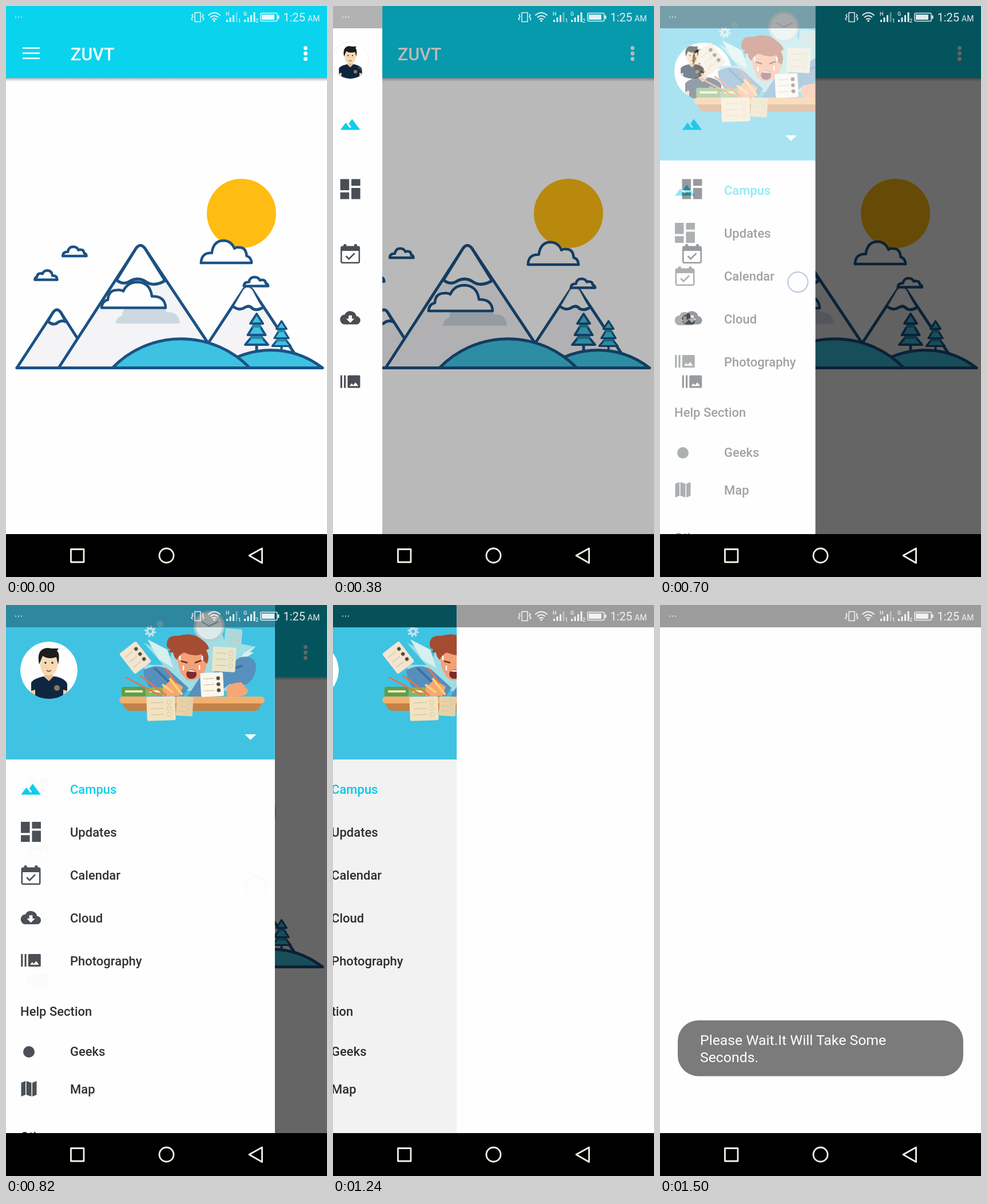
An HTML page that plays this animation: 561 px wide and 998 px high, repeating every 1520 ms.

```html
<!DOCTYPE html>
<html lang="en">
<head>
<meta charset="utf-8">
<title>Navigation drawer</title>
<style>
html, body { margin: 0; width: 100%; height: 100%; overflow: hidden; background: #fff; }
svg { display: block; width: 561px; height: 998px; font-family: Roboto, sans-serif; }
.ink { stroke: #1b5284; stroke-width: 5; stroke-linejoin: round; stroke-linecap: round; }
.cloud { fill: #fefefe; stroke: #1b5284; stroke-width: 4.5; stroke-linejoin: round; }
.icon { fill: #484e53; }
.menu { font-size: 22px; font-weight: 500; fill: #302f2c; }
.line { fill: none; stroke: #fff; }
</style>
</head>
<body>
<svg viewBox="0 0 561 998">
<defs>
  <linearGradient id="drop" x2="0" y2="1"><stop stop-color="#000" stop-opacity=".28"/><stop offset="1" stop-color="#000" stop-opacity="0"/></linearGradient>
  <clipPath id="drawerClip"><rect id="clipRect" height="923"/></clipPath>
  <clipPath id="round"><circle r="50"/></clipPath>
  <path id="puff" vector-effect="non-scaling-stroke" d="M1 46Q2 34 12 32Q13 15 28 15Q35 14 39 17Q46 1 64 1Q86 2 89 26Q112 25 113 46Z"/>
  <g id="tree">
    <path class="ink" d="M0 56V66"/>
    <g fill="#3dc2e2" class="ink" style="stroke-width:4">
      <path d="M0 32L20 56H-20Z"/><path d="M0 14L15.500 39H-15.500Z"/><path d="M0 2L11 19H-11Z"/>
    </g>
    <path d="M-9 41H9L12 46H-12ZM-7 21H7L10 26H-10Z" fill="#2b88a8"/>
  </g>
  <g id="avatar" clip-path="url(#round)">
    <circle r="50" fill="#fff"/>
    <path d="M-31 50V22Q-28 15-10 11H12Q29 15 32 24V50Z" fill="#0d2440"/>
    <path d="M-31 36L-24 34V50H-36ZM32 36L25 34V50H37Z" fill="#f0cda2"/>
    <path d="M-7 5H7V12L0 19L-8 12Z" fill="#e6bd91"/>
    <path d="M-15-25H15V-8Q13 9 0 9Q-13 9-15-8Z" fill="#f6dab3"/>
    <path d="M-17-10Q-21-30-12-36Q-5-41 4-38L17-38L14-34Q20-29 16-10L13-23Q0-18-11-25Z" fill="#1c1b1b"/>
    <circle cx="-6" cy="-13" r="1.8" fill="#332b28"/><circle cx="6" cy="-13" r="1.8" fill="#332b28"/>
    <path d="M-4 0Q0 4 4 0" fill="none" stroke="#a85a48" stroke-width="1.8"/>
    <circle cx="14" cy="31" r="5" fill="#8f7656"/>
  </g>
  <g id="gear" fill="none" stroke="#c3e3ea"><circle r="5" stroke-width="4"/><circle r="8" stroke-width="4" stroke-dasharray="3.140"/></g>
</defs>

<g id="app">
  <rect width="561" height="923" fill="#fefefe"/>
  <circle cx="411.5" cy="362.5" r="60.5" fill="#ffbc12"/>
  <g class="ink" fill="#f4f3f6">
    <path d="M19 632.500L82 536Q89 526 96 536L158 632.500Z"/>
    <path d="M325 632.500L414 497Q422 486 431 497L521 632.500Z"/>
    <path d="M92 632.500L227 424Q235 413 243 424L382 632.500Z"/>
  </g>
  <g class="ink" fill="#fefefe">
    <path d="M73 551L82 536Q89 526 96 536L105 552Q96 548 88 555Q81 558 73 551Z"/>
    <path d="M398 525L414 497Q422 486 431 497L447 528Q438 533 431 529Q425 522 417 527Q409 533 398 525Z" fill-opacity=".9" stroke="none"/>
    <path d="M193 479L227 424Q235 413 243 424L278 480Q260 491 246 483Q232 473 218 480Q206 489 193 479Z"/>
    <path d="M398 526Q409 533 417 527Q425 522 431 529Q438 533 447 528" fill="none"/>
  </g>
  <g id="midShadow"><use href="#puff" transform="translate(191 509)" fill="#cdd8e1"/></g>
  <g id="clouds" class="cloud"></g>
  <use href="#tree" x="438" y="536"/>
  <use href="#tree" transform="translate(481.5 549) scale(.81)"/>
  <g class="ink" fill="#3dc2e2">
    <path d="M373 632.500A146 146 0 0 1 553 632.500Z"/>
    <path d="M186 632.500A167 167 0 0 1 426 632.500Z"/>
    <path d="M19 632.500H553"/>
  </g>
  <rect y="126" width="561" height="6" fill="url(#drop)"/>
  <rect width="561" height="126" fill="#09d3ed"/>
  <path class="line" stroke-width="2.7" d="M29 73.5H59M29 82.5H59M29 91.5H59"/>
  <text x="113" y="95" font-size="30.5" font-weight="500" fill="#fff">ZUVT</text>
  <g fill="#fff"><circle cx="523.5" cy="73.5" r="3.4"/><circle cx="523.5" cy="83" r="3.4"/><circle cx="523.5" cy="92.5" r="3.4"/></g>
  <rect id="scrim" width="561" height="923"/>

  <g id="drawer" clip-path="url(#drawerClip)">
    <rect width="474" height="923" fill="#fefefe"/>
    <g id="mini">
      <circle cx="56" cy="95" r="32.5" fill="none" stroke="#eee"/>
      <use href="#avatar" transform="translate(56 95) scale(.64)"/>
    </g>
    <g id="full">
      <rect width="474" height="923" fill="#fefefe"/>
      <rect width="474" height="270" fill="#3ec3e3"/>
      <use href="#avatar" x="75" y="114"/>
      <g id="desk">
        <path d="M244 66L291 91L298 58L335 66L365 14L385 62L439 73L421 92L440 104L400 150H285L238 104L278 105Z" fill="#9fdde5"/>
        <path d="M250 60L285 78L295 110L270 95ZM418 84L440 71L428 82L436 83L412 99Z" fill="#d5f0ee"/>
        <use href="#gear" x="255" y="46"/><use href="#gear" transform="translate(272 33) scale(.6)" opacity=".6"/>
        <circle cx="358" cy="37" r="25" fill="#dcebea" stroke="#b3cdd2" stroke-width="4"/>
        <path d="M358 37L345 29M358 37L374 29" stroke="#8fa3aa" stroke-width="2"/>
        <path d="M243 114Q266 101 287 113L322 145L312 160H269Q244 139 243 114ZM342 126L383 111L411 92Q435 85 440 105Q440 128 423 139L394 138L366 160H320Z" fill="#568fbd"/>
        <path d="M262 110Q280 126 306 154M388 115L416 106" fill="none" stroke="#3a729f" stroke-width="4"/>
        <path d="M388 148Q391 136 414 135L426 149Q425 160 407 160H389ZM273 148L292 130L312 143L306 159H277Z" fill="#f7a574"/>
        <path d="M303 78L349 74Q359 92 350 117Q338 134 320 131Q300 118 303 78Z" fill="#f3a076"/>
        <path d="M284 70Q283 52 304 54Q330 46 347 62Q354 66 358 76L353 79Q360 91 354 103L348 97L345 86Q332 91 314 83Q304 87 302 96Q296 92 295 83L288 83L290 77Q284 76 284 70Z" fill="#a44b31"/>
        <ellipse cx="327" cy="121" rx="9" ry="8" fill="#7b2930"/><path d="M320 116Q327 111 335 117Z" fill="#fff"/>
        <path d="M309 98L320 101M333 101L344 97" stroke="#603029" stroke-width="2.5"/>
        <path d="M307 89V96M346 89V96M313 106V114M341 105V113" stroke="#fff" stroke-width="2.500"/>
        <rect x="201" y="160" width="254" height="12" rx="6" fill="#f1b16f"/>
        <path d="M207 172H449Q447 185 436 185H220Q209 184 207 172Z" fill="#c38145"/>
        <rect x="205" y="143" width="42" height="17" rx="3" fill="#5e9e4a"/><rect x="248" y="144" width="29" height="15" rx="3" fill="#8db553"/>
        <path d="M211 151H242M254 151H274" stroke="#efe8bc" stroke-width="4"/>
        <path d="M212 126L270 157M237 123L283 158M281 110L301 137" stroke="#e2744d" stroke-width="3"/>
        <path d="M289 128L311 157M276 139L295 153" stroke="#ffd26b" stroke-width="4"/>
        <g id="papers"></g>
      </g>
      <path id="arrow" d="M-10 226H10L0 236Z" fill="#fff"/>
    </g>
    <rect id="strip" width="474" height="39"/>
  </g>
  <rect id="shade" y="270" width="561" height="653"/>
</g>

<g id="page">
  <rect width="561" height="923" fill="#fefefe"/>
  <rect width="561" height="39" fill="#9c9c9c"/>
</g>
<g id="toast">
  <rect x="31" y="726" width="499" height="97.500" rx="36" fill="#7b7b7b"/>
  <g font-size="24.8" fill="#fff"><text x="70" y="769">Please Wait.It Will Take Some</text><text x="70" y="799">Seconds.</text></g>
</g>
<circle id="tap" cx="58.500" cy="99.500" r="12" fill="none" stroke="#fff" stroke-width="9"/>
<circle id="finger" r="17.500" fill="#fff" fill-opacity=".65" stroke="#b9c6dc" stroke-width="2"/>

<g id="status" fill="#fff" opacity=".88">
  <path d="M16 18.500h2v2h-2zM21 18.500h2v2h-2zM26 18.500h2v2h-2z" opacity=".8"/>
  <path class="line" stroke-width="1.500" d="M330 11.500H340V27.500H330ZM327 14L325 17L327 19L324 22L326 25M343 14L345 17L343 19L346 22L344 25"/>
  <path class="line" stroke-width="2" d="M353.500 16.500Q364 7 374.500 16.500M357 20Q364 14 371 20M360 23.500Q364 20.500 368 23.500"/>
  <circle cx="364" cy="26" r="1.800"/>
  <path d="M385 24h3v4h-3zM390.500 20h3v8h-3zM396 16h3v12h-3z"/><path d="M401.500 11h3v17h-3z" opacity=".4"/>
  <path d="M416 24h3v4h-3zM421.500 20h3v8h-3zM427 16h3v12h-3zM432.500 11h3v17h-3z"/>
  <g font-size="9" font-weight="500"><text x="384" y="17">H</text><text x="415" y="17">G</text><text x="405.500" y="29">1</text><text x="436" y="29">2</text></g>
  <rect class="line" x="445" y="12.500" width="29" height="14" rx="2" stroke-width="1.500"/>
  <path d="M447 15H469V24H447ZM475 16.500H477.500V22.500H475Z"/>
  <text x="484.500" y="27" font-size="20">1:25</text><text x="527" y="27" font-size="14">AM</text>
</g>
<rect y="923" width="561" height="75"/>
<g fill="none" stroke="#f5f3e4" stroke-width="2.800" stroke-linejoin="round">
  <rect x="113.500" y="949.500" width="22.500" height="22.500"/><circle cx="280.500" cy="960.500" r="12.500"/><path d="M425 960.500L447.500 948V973.500Z"/>
</g>
</svg>
<script>
const $ = id => document.getElementById(id);
const set = (id, attrs) => { for (const k in attrs) $(id).setAttribute(k, attrs[k]); };
const add = (id, markup) => $(id).insertAdjacentHTML('beforeend', markup);

// Menu rows: label, icon scale, mini y, full y, icon path on a 24 unit grid
const rows = [
  ['Campus', 1.57, 207, 322, 'M14 6l-3.75 5 2.85 3.8-1.6 1.2C9.8 13.75 7 10 7 10l-6 8h22z'],
  ['Updates', 1.94, 320, 396.5, 'M3 13h8V3H3zm0 8h8v-6H3zm10 0h8V11h-8zm0-18v6h8V3z'],
  ['Calendar', 1.7, 433, 472, 'M17 12L15.900 10.900L10.600 16.200L8.200 13.800L7.100 14.900L10.600 18.400zM20 4h-1V3Q19 2 17.500 2T16 3V4H8V3Q8 2 6.500 2T5 3V4H4Q2 4 2 6V20Q2 22 4 22H20Q22 22 22 20V6Q22 4 20 4zm.5 16.500H3.500V9h17z'],
  ['Cloud', 1.45, 545, 546.5, 'M19.35 10A7.500 7.500 0 0 0 5.350 8A6 6 0 0 0 6 20H19A5 5 0 0 0 19.350 10zM17 13l-5 5-5-5h3V9h4v4z'],
  ['Photography', 1.57, 656.5, 621, 'M1 5h2v14H1zm4 0h2v14H5zm17 0H10Q9 5 9 6V18Q9 19 10 19H22Q23 19 23 18V6Q23 5 22 5zM11 17l2.5-3.15L15.3 16l2.5-3.2L21 17z']
];
const icon = (x, y, s, d, fill) =>
  `<path class="icon" fill-rule="evenodd" style="${fill}" transform="translate(${x} ${y}) scale(${s}) translate(-12 -12)" d="${d}"/>`;
const label = (x, y, text, fill = '') => `<text class="menu" x="${x}" y="${y}" style="${fill}">${text}</text>`;

rows.forEach(([name, s, miniY, fullY, d], i) => {
  const fill = i ? '' : 'fill:#0acfec';
  add('mini', icon(56, miniY, s, d, fill));
  add('full', icon(43.5, fullY, s, d, fill) + label(112, 330 + i * 75, name, fill));
});
add('full', label(25, 718, 'Help Section') + label(112, 788, 'Geeks') + label(112, 854, 'Map') + label(25, 937, 'Others')
  + '<circle class="icon" cx="40" cy="781" r="10"/>'
  + icon(40, 845.5, 1.5, 'M3 5l5-2v16l-5 2zM9 3l6 2v16l-6-2zM16 5l5-2v16l-5 2z', ''));

// Loose sheets: centre, size, rotation, colour
[[400, 57, 30, 31, 5, '#a5dce0'], [384, 95, 41, 43, 3, '#e9e5ca'], [229, 92, 37, 45, -38, '#f4e5cf'],
 [315, 177, 29, 34, 3, '#e9d1a4'], [274, 181, 50, 42, -2, '#f3e2bd'], [363, 139, 40, 42, -3, '#fbf7ee']]
  .forEach(([x, y, w, h, turn, fill], i) => {
    const marks = [-.25, 0, .25].map(k => `<path d="M${-w * .36} ${h * k}H${w * .1}" stroke="#d0cbb2" stroke-width="1.5"/>
      <circle cx="${w * .28}" cy="${h * k}" r="3.5" fill="${i % 3 == 2 ? '#4b4745' : 'none'}" stroke="#d3c9ac"/>`).join('');
    add('papers', `<g transform="translate(${x} ${y}) rotate(${turn})"><rect x="${-w / 2}" y="${-h / 2}" width="${w}" height="${h}" rx="3" fill="${fill}"/>${marks}</g>`);
  });

// Clouds: x, y, horizontal scale (negative mirrors), vertical scale
[[166, 481.5, 1, 1], [430, 409, -.79, .87], [141, 420.5, -.37, .36], [50, 462, .35, .36], [458.5, 473.5, -.38, .35]]
  .forEach(([x, y, sx, sy], i) =>
    add('clouds', `<g id="cloud${i}"><use href="#puff" transform="translate(${x} ${y}) scale(${sx} ${sy})"/></g>`));

const ramp = (t, start, length) => Math.min(1, Math.max(0, (t - start) / length));
const easeOut = u => 1 - (1 - u) ** 2;
const smooth = u => u * u * (3 - 2 * u);
const move = (x, y) => `translate(${x} ${y})`;

function draw(t) {
  const opened = easeOut(ramp(t, 277, 200));
  const expanded = smooth(ramp(t, 585, 252));
  const slide = easeOut(ramp(t, 1150, 240));
  const width = 112 + 362 * expanded;

  const midBob = 6 * Math.sin(Math.PI * t / 640) ** 2;
  const bob = 3 * Math.abs(Math.sin(Math.PI * t / 900));
  for (let i = 0; i < 5; i++) set('cloud' + i, { transform: move(0, i ? bob : midBob) });
  set('midShadow', { transform: move(0, midBob * .7) });

  set('scrim', { opacity: .6 * opened ** 3 });
  set('drawer', { transform: move(112 * (opened - 1), 0), visibility: opened ? 'visible' : 'hidden' });
  set('clipRect', { width });
  set('full', { opacity: expanded });
  set('desk', { transform: move(.7 * (width - 474), 0) });
  set('arrow', { transform: move(width - 42.5, 0) });
  set('strip', slide ? { fill: '#06505a', opacity: 1 } : { fill: '#000', opacity: .3 });

  // The next page slides over while the old one trails at a third of the speed
  set('app', { transform: move(-187 * slide, 0) });
  set('shade', { opacity: .075 * slide });
  set('page', { transform: move(561 * (1 - slide), 0), visibility: slide ? 'visible' : 'hidden' });
  set('toast', { opacity: ramp(t, 1309, 180) });

  set('tap', { opacity: .6 * ramp(t, 180, 50) * (1 - ramp(t, 330, 70)) });
  const drag = smooth(ramp(t, 580, 240));
  const second = t > 950;
  set('finger', {
    cx: second ? 48 : 40 + 397 * drag,
    cy: second ? 392 : 473 + 19 * drag,
    opacity: second ? ramp(t, 1020, 50) * (1 - ramp(t, 1110, 60)) : ramp(t, 510, 50) * (1 - ramp(t, 750, 77))
  });
}

const start = performance.now();
(function tick() {
  draw((performance.now() - start) % 1520);
  requestAnimationFrame(tick);
})();
</script>
</body>
</html>
```
